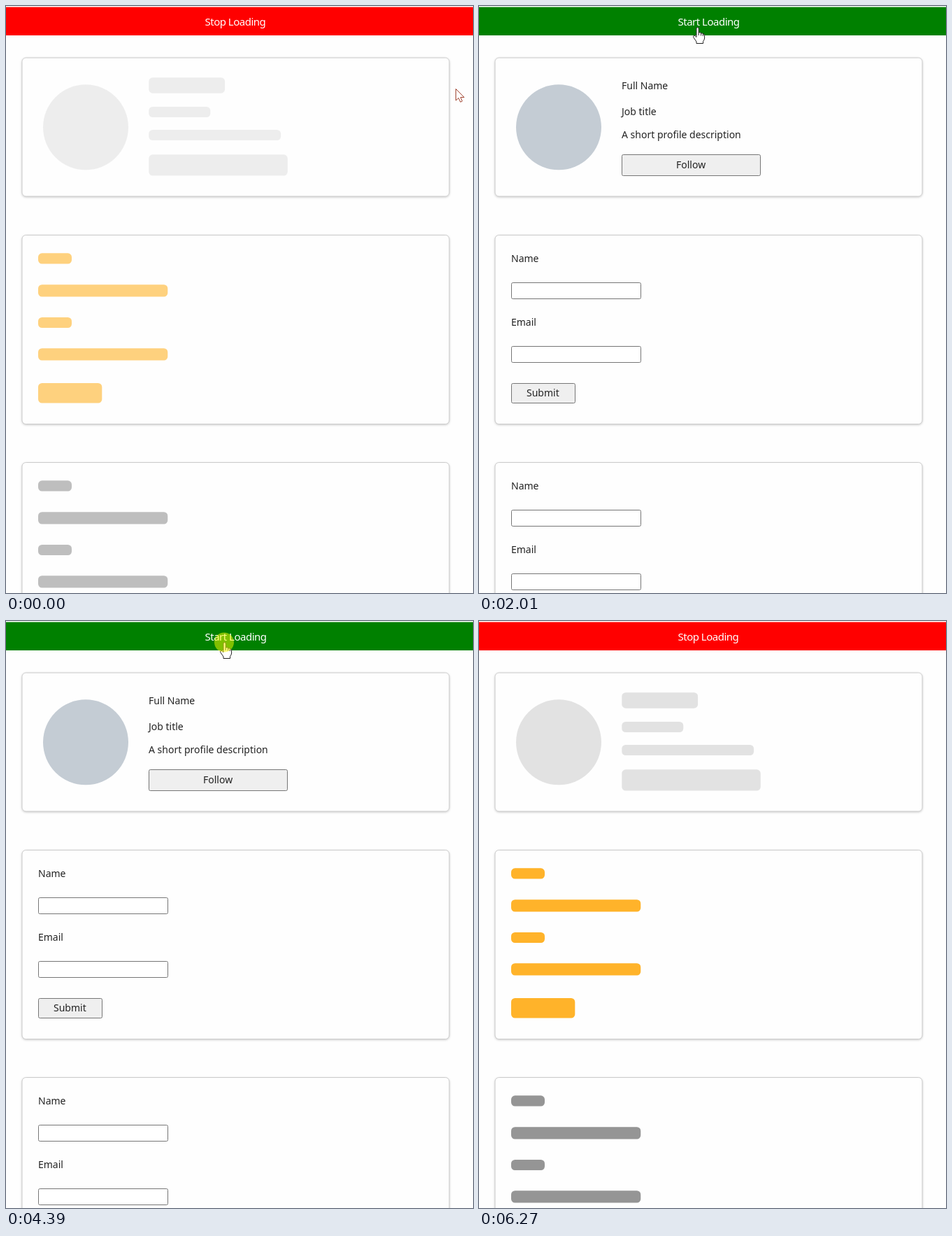
Animation, 668 px wide and 839 px high, one loop 6.34 s. Source, as an HTML page:

```html
<!DOCTYPE html>
<html lang="en">
<head>
<meta charset="utf-8">
<title>Skeleton loading</title>
<style>
  html, body { margin: 0; width: 100%; height: 100%; overflow: hidden; background: #fefefe; }
  svg { display: block; width: 668px; height: 839px; }
  text { font-family: "Noto Sans", sans-serif; font-size: 14px; fill: #222; }
  #label { font-size: 15px; letter-spacing: -.5px; fill: #fff; }
  .card { fill: #fefefe; stroke: #ccc; filter: drop-shadow(0 1px 1.5px rgba(0, 0, 0, .2)); }
  .field { fill: #fff; stroke: #767676; }
  .button { fill: #efefef; stroke: #767676; }
  .pointer { fill: #fff; stroke-linejoin: round; }
</style>
</head>
<body>
<svg viewBox="0 0 668 839">
  <rect id="banner" y="1.5" width="668" height="40.5"/>
  <text id="label" x="284.5" y="28"></text>
  <rect class="card" x="23" y="74" width="611" height="198" rx="5.5"/>
  <rect class="card" x="23" y="327.5" width="611" height="270" rx="5.5"/>
  <rect class="card" x="23" y="652.5" width="611" height="270" rx="5.5"/>
  <g id="skeleton"></g>
  <g id="content"></g>
  <path id="arrow" class="pointer" stroke="#a0432f" d="M.5 .5V17L4.3 13.5L7 19.3L9.6 18L7.2 12.5H12.3Z"/>
  <path id="hand" class="pointer" stroke="#222" d="M-1 2.2Q-1 .6 .6 .6T2.2 2.2V8Q5 7 5.6 9Q8 8.2 8.4 10Q10.6 9.6 10.6 12V16Q10.6 18 8.6 20.5V23.5H-1V21L-5.4 14.5Q-6 12.5-4.4 12.2Q-3 12-1 14.5ZM2.2 8v4M5.6 9v3.5M8.4 10v3"/>
  <circle id="click" cx="312" cy="30.5" r="14" fill="#ff0" opacity=".5"/>
</svg>
<script>
const LOOP = 6340;
const PULSE = 2000;
const loadedSpans = [[2010, 2810], [3860, 4660]];
const clickSpans = [[1670, 1860], [2610, 2810], [3650, 3860], [4390, 4590]];
const pulseStarts = [-1000, 2865, 4665];
// Pointer stops: time, x, y
const stops = [[0, 643, 118], [200, 643, 118], [760, 376, 150], [900, 376, 150],
               [1520, 312, 30], [4790, 312, 30], [5210, 588, 790], [5360, 588, 790]];

const $ = id => document.getElementById(id);
const bar = (x, y, w, h, fill) =>
  `<rect x="${x}" y="${y}" width="${w}" height="${h}" rx="5.5" fill="${fill}"/>`;
const box = (kind, x, y, w, h) =>
  `<rect class="${kind}" x="${x}" y="${y}" width="${w}" height="${h}" rx="2"/>`;
const text = (x, y, words) => `<text x="${x}" y="${y}">${words}</text>`;

const formBars = (dy, fill) =>
  bar(46, 353.3 + dy, 48, 15.3, fill) + bar(46, 398.2 + dy, 185.3, 17.3, fill) +
  bar(46, 445 + dy, 48, 15, fill) + bar(46, 489.2 + dy, 185.3, 17.3, fill) +
  bar(46, 539 + dy, 91.3, 28.5, fill);

const formContent = dy =>
  text(46, 366 + dy, "Name") + box("field", 46.5, 395.5 + dy, 185, 23) +
  text(46, 457 + dy, "Email") + box("field", 46.5, 486.5 + dy, 185, 23) +
  box("button", 46.5, 539.5 + dy, 91, 28) + text(68, 558 + dy, "Submit");

$("skeleton").innerHTML =
  '<circle cx="114" cy="173.3" r="61" fill="#ddd"/>' +
  bar(204.3, 102.2, 108.8, 22.5, "#ddd") + bar(204.3, 144, 88, 15, "#ddd") +
  bar(204.3, 177, 188.8, 15, "#ddd") + bar(204.3, 212.3, 198.5, 30.2, "#ddd") +
  formBars(0, "orange") + formBars(325, "gray");

$("content").innerHTML =
  '<circle cx="114" cy="173.3" r="61" fill="#c4ccd4"/>' +
  text(204, 119, "Full Name") + text(204, 156, "Job title") +
  text(204, 189, "A short profile description") +
  box("button", 204.5, 212.5, 198, 30) + text(282, 232, "Follow") +
  formContent(0) + formContent(325);

const within = (spans, t) => spans.some(([from, to]) => t >= from && t < to);
const smooth = s => s * s * (3 - 2 * s);
const show = (id, on) => { $(id).style.display = on ? "" : "none"; };

// cubic-bezier(.4, 0, .6, 1), solved by bisection
function ease(x) {
  let low = 0, high = 1;
  for (let i = 0; i < 20; i++) {
    const s = (low + high) / 2;
    const at = 1.2 * s * (1 - s) ** 2 + 1.8 * s * s * (1 - s) + s ** 3;
    if (at < x) low = s; else high = s;
  }
  return smooth(low);
}

function pulse(t) {
  const start = pulseStarts.filter(s => s <= t).pop();
  const phase = (t - start) % PULSE / (PULSE / 2);
  return 1 - ease(phase < 1 ? phase : 2 - phase) / 2;
}

function pointerAt(t) {
  const i = stops.findIndex(stop => stop[0] > t);
  const [t0, x0, y0] = stops[i - 1], [t1, x1, y1] = stops[i];
  const k = smooth((t - t0) / (t1 - t0));
  return [x0 + (x1 - x0) * k, y0 + (y1 - y0) * k];
}

function draw(t) {
  const loaded = within(loadedSpans, t);
  show("skeleton", !loaded);
  show("content", loaded);
  $("banner").setAttribute("fill", loaded ? "green" : "red");
  $("label").textContent = loaded ? "Start Loading" : "Stop Loading";
  for (const shape of $("skeleton").children)
    shape.setAttribute("opacity", loaded ? 1 : pulse(t));

  const visible = t < 5360;
  const [x, y] = visible ? pointerAt(t) : [0, 0];
  show("arrow", visible && y >= 42);
  show("hand", visible && y < 42);
  for (const id of ["arrow", "hand"])
    $(id).setAttribute("transform", `translate(${x} ${y})`);
  show("click", within(clickSpans, t));
}

function tick() {
  draw(performance.now() % LOOP);
  requestAnimationFrame(tick);
}
tick();
</script>
</body>
</html>
```
